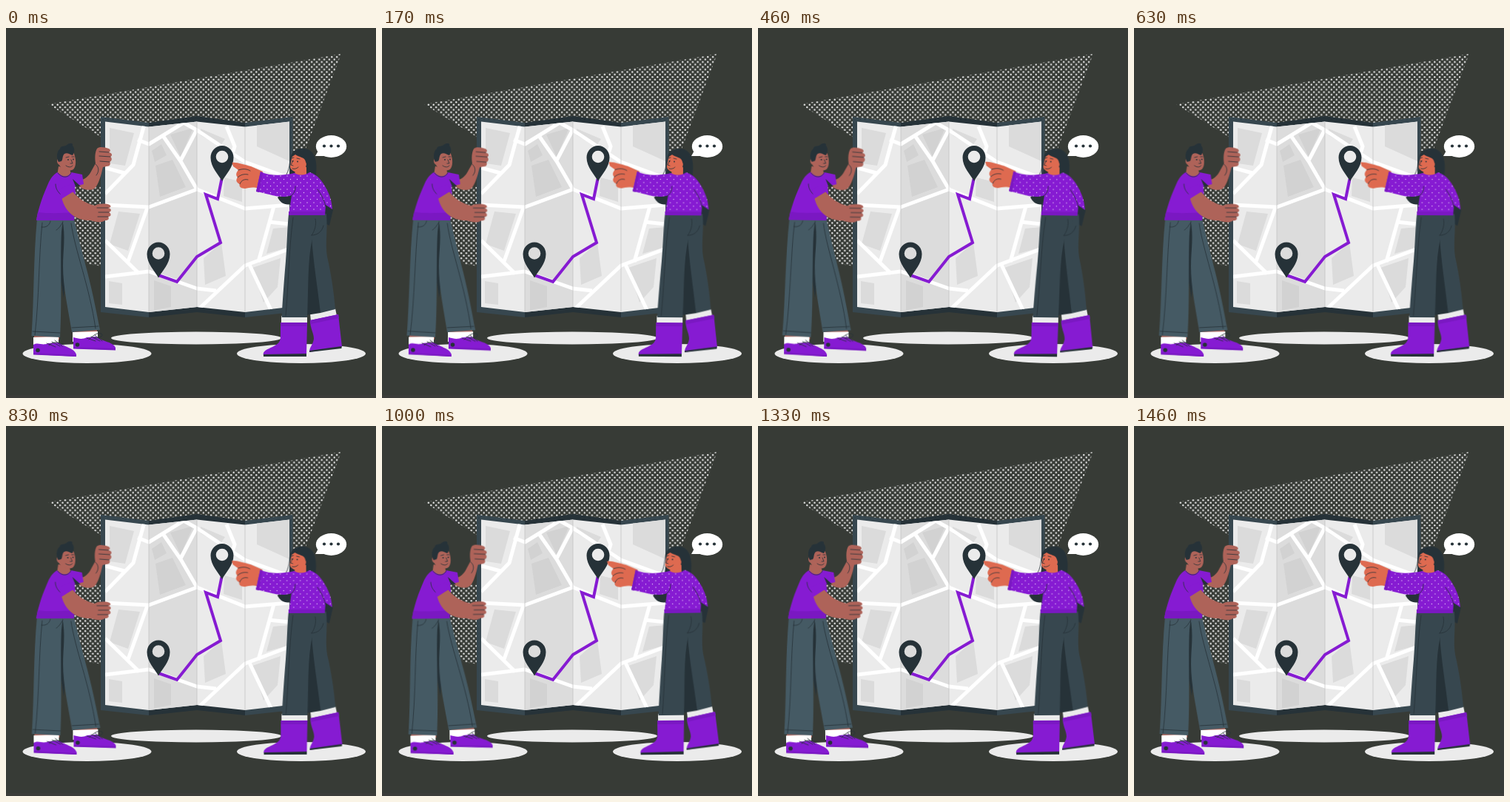
An HTML page for the animation above (1500 ms loop, 500 px wide and 500 px high).

```html
<!DOCTYPE html>
<html lang="en">
<head>
<meta charset="utf-8">
<title>Map reading</title>
<style>
  html, body { margin: 0; width: 100%; height: 100%; overflow: hidden; background: #373b36; }
  svg { display: block; width: 100vw; height: 100vh; }
  .purple { fill: #861bd2; }
  .shade { fill: #7a18c2; }
  .dark { fill: #263238; }
  .slate { fill: #37474f; }
  .denim { fill: #455a64; }
  .tan { fill: #ae6359; }
  .coral { fill: #de6a50; }
  .white { fill: #fff; }
  .pale { fill: #ebebeb; }
  .grey { fill: #dbdbdb; }
  .deep { fill: #d2d2d2; }
  .line { fill: none; stroke: #263238; stroke-width: .8; stroke-linecap: round; stroke-linejoin: round; }
  .road { fill: none; stroke: #fff; stroke-width: 5; stroke-linejoin: round; }
  #man { transform-origin: 90px 300px; }
  #woman { transform-origin: 380px 304px; }
</style>
</head>
<body>
<svg viewBox="0 0 500 500" xmlns="http://www.w3.org/2000/svg">
  <defs>
    <pattern id="halftone" width="6.8" height="6.8" patternUnits="userSpaceOnUse">
      <g fill="#ebebeb"><circle cx="1.7" cy="1.7" r="1.2"/><circle cx="5.1" cy="5.1" r="1.2"/></g>
    </pattern>
    <pattern id="knit" width="9" height="9" patternUnits="userSpaceOnUse">
      <g fill="#e6d0f7"><circle cx="2" cy="2" r=".65"/><circle cx="6.5" cy="6.5" r=".65"/></g>
    </pattern>
    <clipPath id="sheet"><path d="M134 126.500L193 133.500L258 126.500L323 133.500L383 126.500V377L323 384L258 377L193 384L134 377Z"/></clipPath>
    <path id="pin" class="dark" fill-rule="evenodd" d="M0 33C-5 24-15.500 14-15.500 1A15.500 16 0 0 1 15.500 1C15.500 14 5 24 0 33ZM-8.300 0A8.300 8.300 0 1 0 8.300 0A8.300 8.300 0 1 0-8.300 0Z"/>
    <path id="sweater" d="M344 194C356 200 372 200 390 196C397 200 405 199 410 195C419 197 425 204 430 212C436 222 440 231 441 245L432 239L431 253H382L386 226C371 232 353 223 338 221Z"/>
  </defs>

  <rect y="496" width="500" height="4" fill="#3b3c39"/>
  <path fill="url(#halftone)" d="M57 103L453 35L404 166H380V200H134V151Z"/>
  <path fill="url(#halftone)" d="M88 196L104 211L130 215V322L110 319L88 290Z"/>

  <g class="pale">
    <ellipse cx="109.500" cy="440" rx="87" ry="13"/>
    <ellipse cx="257" cy="419" rx="115" ry="8.500"/>
    <ellipse cx="399" cy="440" rx="87" ry="13"/>
  </g>

  <!-- map -->
  <path class="slate" d="M128 120L193 128V391L128 384ZM323 128L387.500 120V384L323 391Z"/>
  <path class="dark" d="M193 128L258 119L323 128V391L258 384L193 391Z"/>
  <g clip-path="url(#sheet)">
    <path class="pale" d="M134 120H390V392H134Z"/>
    <path fill="#dcdcdc" d="M193 120H258V392H193Z"/>
    <g class="grey">
      <path d="M140 135L173 142L161 186L140 183Z"/>
      <path d="M152 248L181 251L165 301L140 292Z"/>
      <path d="M139 342L157 345V374L139 372Z"/>
      <path d="M267 311L291 290L297 335L269 347Z"/>
      <path d="M339 131L383 126V180L339 160Z"/>
      <path d="M295 202L319 208V235L294 227Z"/>
      <path d="M361 271L383 269V296L352 305Z"/>
      <path d="M333 324L371 311L367 350L348 371Z"/>
      <path d="M263 136L296 150L289 160L263 145Z"/>
    </g>
    <g class="deep">
      <path d="M200 341L223 349V377L200 381Z"/>
      <path d="M197 166L210 157L217 172L201 181Z"/>
      <path d="M202 186L225 178L243 215L208 228Z"/>
      <path d="M222 144L253 135L236 174Z"/>
    </g>
    <g class="road">
      <path d="M134 239L193 242L258 218L323 244L383 239"/>
      <path d="M187 130L172 185L134 224M178 151L193 157L240 128L258 138L323 181L383 203"/>
      <path d="M213 147L236 180L258 218M236 179L258 137M160 196L134 189"/>
      <path d="M191 243L164 318M134 287L180 332M134 336L193 329L258 352L284 355"/>
      <path d="M298 133L309 160L300 190M362 241L341 316M355 262L384 265"/>
      <path d="M258 382L323 321L384 298M329 320L358 381"/>
    </g>
    <path fill="none" stroke="#bdbdbd" stroke-width=".7" d="M193 133V385M258 126V378M323 133V385"/>
  </g>
  <path fill="none" stroke="#861bd2" stroke-width="4" d="M291.500 204L286 231L270 225L290 290L258 309L231 343L206 334"/>
  <use href="#pin" x="292" y="174"/>
  <use href="#pin" x="206" y="304.500"/>

  <!-- speech bubble -->
  <g class="white"><ellipse cx="439.500" cy="160" rx="20.700" ry="15"/><path d="M418 173L423 164L430 173Z"/></g>
  <g class="dark"><circle cx="430" cy="159.500" r="2.100"/><circle cx="439.500" cy="159.500" r="2.100"/><circle cx="449" cy="159.500" r="2.100"/></g>

  <g id="man">
    <path class="tan" d="M98 206C106 206 113 199 116 192L121 183C120 176 120 168 123 163C126 160 133 161 139 163C142 165 141 167 139 168C144 169 144 173 141 174C144 176 143 180 140 181C142 184 140 187 136 187L131 188C129 196 127 206 122 214C117 222 105 219 96 213Z"/>
    <path class="line" d="M126 167L139 168M126 173L141 174M127 180L140 181M121 184C126 188 126 194 122 199"/>
    <path class="tan" d="M71 187L69 200C75 206 83 205 88 198L86 190Z"/>
    <path class="tan" d="M72 170C77 163 89 164 92 170C95 178 95 187 91 191C84 195 75 191 72 185C68 183 68 176 72 176Z"/>
    <path class="dark" d="M71 181C68 176 68 167 73 163C74 158 80 161 82 158C86 155 91 155 90 159C94 164 92 169 90 172C86 171 83 168 79 170C76 172 77 178 75 180Z"/>
    <path class="line" d="M81 175L85 174M89 174L92 174M88 178L90 183L87 183M81 186C85 189 89 188 90 186"/>
    <circle class="dark" cx="84" cy="178" r=".9"/><circle class="dark" cx="91" cy="177.500" r=".9"/>

    <path class="dark" d="M73 258L88 260L84 300L78 365L72 330Z"/>
    <path class="tan" d="M38 414H72V421H38ZM92 407L123 406V414H92Z"/>
    <path class="white" d="M37 418L71 417V432H37ZM90 411L124 410V424H90Z"/>
    <path class="denim" d="M76 258H92C96 277 105 310 110 330C118 361 123 388 127 408L89 411C84 380 77 350 77 322C77 300 81 282 76 258Z"/>
    <path class="denim" d="M42 258H77L75 275C73 310 76 365 73 418L34.500 416C38 365 37 310 42 258Z"/>
    <path class="line" d="M49 263C44 310 45 365 39 415M77 262C73 269 70 272 68 273M48 269C55 270 59 266 60 261M88 264C93 300 113 350 121 406M36 410L73 412M89 405L125 403"/>
    <path class="purple" d="M37 428C44 424 49 430 57 426L71 425C78 431 92 432 95 441V444L37 441Z"/>
    <path class="purple" d="M91 418C98 420 103 421 110 418L122 417C130 424 145 424 148 432V435L91 433Z"/>
    <path class="shade" d="M37 439L95 442V444L37 441.500ZM91 431L148 433V435.500L91 433.500Z"/>
    <circle class="dark" cx="43" cy="435.500" r="2.800"/><circle class="dark" cx="96.500" cy="428" r="2.800"/>
    <path class="line" d="M55 426L67 431M62 424L73 430M66 422L76 430M58 429C64 423 70 424 78 428M109 419L121 423M115 417L127 423M120 415L130 423M112 421C119 414 126 410 130 414C131 418 123 420 118 418"/>

    <path class="purple" d="M70 195C76 202 84 202 88 195L103 198L105 211L93 214C95 227 93 244 92 260H41C44 242 50 226 58 208C62 201 65 197 70 195Z"/>
    <path class="shade" d="M43 249C60 251 78 250 92 249V260H41Z"/>
    <path class="dark" d="M90 204L101 214L94 214Z"/>
    <path class="line" d="M70 196C76 203 84 203 88 196M76 227C70 222 67 217 67 211"/>
    <path class="tan" d="M75 229L90 221C98 231 108 237 120 240C126 237 135 237 140 239C143 241 141 243 138 243C143 244 143 248 139 249C143 251 142 255 138 255C140 258 138 260 134 260C128 264 121 262 114 260C98 260 81 253 75 229Z"/>
    <path class="line" d="M123 243L138 243M125 249L139 249M124 255L138 255"/>
    <path class="purple" d="M72 218L88 211L91 221L75 231Z"/>
  </g>

  <g id="woman">
    <path class="dark" d="M388 168C397 161 411 163 416 172C420 181 417 194 421 207L442 246L437 267L431 264L424 226L386 238C376 240 371 236 367 229C377 222 380 211 383 199Z"/>
    <path class="coral" d="M391 188H406V201H390Z"/>
    <path class="coral" d="M388 171C393 168 401 168 405 174C408 183 405 193 398 195C391 196 384 192 384 187C385 181 386 176 388 171Z"/>
    <path class="dark" d="M385 175C386 165 395 162 404 163C418 165 421 181 419 198L410 200C408 193 407 186 405 181C404 174 396 175 391 171Z"/>
    <path class="line" d="M386 176L389 175M393 176L397 177M388 179L385 185L388 186M387 190C390 191 393 190 395 188"/>
    <circle class="dark" cx="387.500" cy="180" r=".9"/><circle class="dark" cx="394" cy="180.500" r=".9"/>
    <path class="line" d="M386 171C382 180 385 192 376 202"/>

    <path class="pale" d="M372 389H407V400H372ZM411 386L445 379L447 389L412 396Z"/>
    <path class="dark" d="M404 251H434L428 320L425 385L406 388Z"/>
    <path class="slate" d="M412 251H433C435 273 431 290 434 309C440 335 443 358 445 380L425 385C421 350 415 315 413 282Z"/>
    <path class="slate" d="M382 251H425C425 268 419 277 414 284C407 316 409 352 407 391H372.500C374 365 376 338 378 315C380 290 380 270 382 251Z"/>
    <path class="line" d="M388 256C382 300 382 345 378 389M413 280C420 280 427 276 429 267M418 258C420 265 417 275 413 280"/>
    <path class="purple" d="M371 398H407L406 442L348 443C346 436 354 434 360 431C368 427 371 424 371 417Z"/>
    <path class="purple" d="M411 395L449 387L454 431L410 438C410 431 415 428 416 420C416 412 411 406 411 395Z"/>
    <path class="shade" d="M371 398H407V403H371ZM411 395L449 387L450 392L412 400Z"/>
    <path class="dark" d="M348 441L406 440V444H348ZM410 436L453.500 430V433L410 438Z"/>

    <path class="coral" d="M305.500 182C312 181 322 185 331 187L347 194L342 217C333 214 329 216 323 217C318 217 314 214 316 211C311 209 310 205 313 202C310 199 311 195 314 192L307 187Z"/>
    <path class="line" d="M314 192C320 190 325 190 330 193M313 202C317 198 322 197 327 198M316 211C318 205 323 204 327 205"/>
    <use href="#sweater" class="purple"/>
    <use href="#sweater" fill="url(#knit)"/>
    <path class="shade" d="M344 194L347 196L342 222L338 221ZM382 248H431V253H382Z"/>
    <path class="line" d="M386 226C390 223 391 219 391 214M432 241C430 232 426 225 421 218"/>
  </g>
</svg>
<script>
  const sway = [
    { transform: 'rotate(0deg)', offset: 0 },
    { transform: 'rotate(1deg)', offset: .25 },
    { transform: 'rotate(-1deg)', offset: .75 },
    { transform: 'rotate(0deg)', offset: 1 }
  ];
  for (const id of ['man', 'woman']) {
    document.getElementById(id).animate(sway, { duration: 1500, iterations: Infinity });
  }
</script>
</body>
</html>
```
